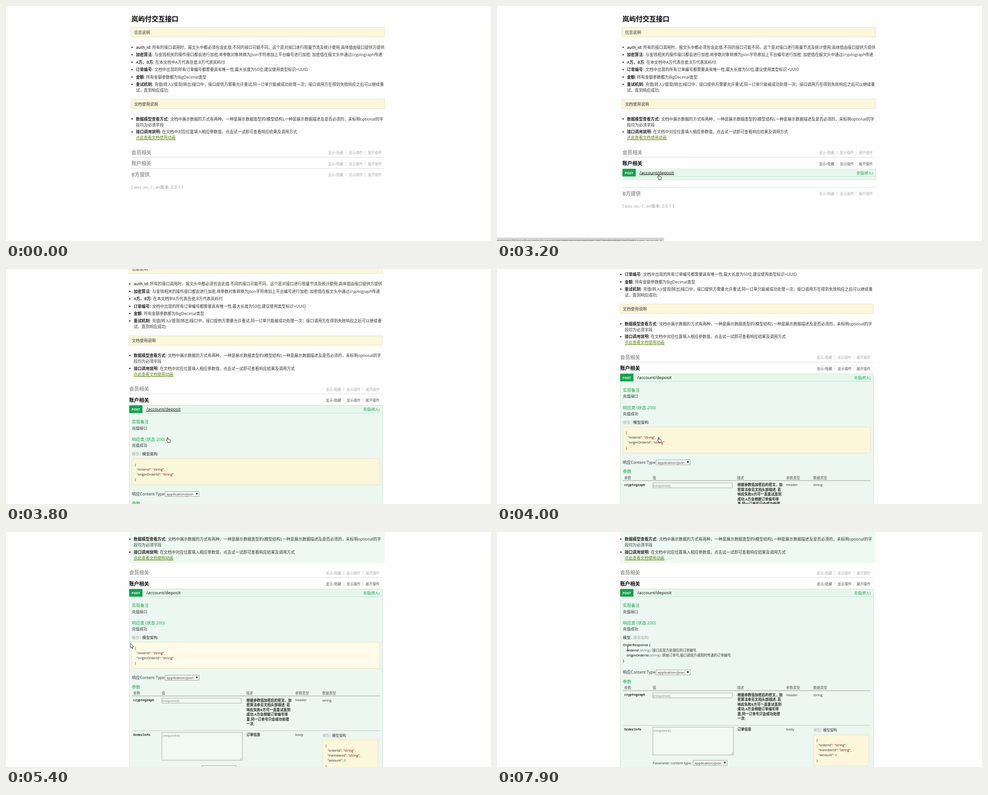
An HTML page that plays this animation: 1075 px wide and 521 px high, repeating every 8 s.

```html
<!DOCTYPE html>
<html lang="zh-CN">
<head>
<meta charset="utf-8">
<title>接口文档</title>
<style>
  html, body { margin: 0; width: 100%; height: 100%; overflow: hidden; background: #fefefe; }
  svg { display: block; }
  text { font-family: 'Open Sans', 'Noto Sans CJK SC', 'Noto Sans CJK', sans-serif; font-size: 8.8px; fill: #333; white-space: pre; }
  .b { font-weight: 600; fill: #222; }
  .h { font-size: 11px; font-weight: 700; fill: #999; }
  .o { font-size: 7.7px; fill: #aaa; }
  .on .h { fill: #000; }
  .on .o { fill: #555; }
  .g { font-size: 9.3px; fill: #10a54a; }
  .s { font-size: 7.7px; }
  .d { font-size: 7.7px; font-weight: 600; fill: #222; }
  .m { font: 700 7px 'Noto Sans Mono', 'DejaVu Sans Mono', monospace; fill: #222; }
  .ph { font-size: 7.8px; font-weight: 700; fill: #aaa; }
  .c { font-size: 7.4px; fill: #222; }
  .r { fill: #800000; }
  .n { fill: #2a8a3c; }
  .md { font-size: 7.5px; }
  .u { text-decoration: underline; }
  .note { fill: #fcf6db; stroke: #ebe3c2; }
  .field { fill: #f0f9f4; stroke: #aaa; }
</style>
</head>
<body>
<svg id="stage" xmlns="http://www.w3.org/2000/svg" width="1075" height="521" viewBox="0 0 1075 521"></svg>
<script>
const txt = (x, y, s, cls = '', extra = '') => `<text x="${x}" y="${y}" class="${cls}" ${extra}>${s}</text>`;
const box = (x, y, w, h, attrs) => `<rect x="${x}" y="${y}" width="${w}" height="${h}" ${attrs}/>`;
const rule = (x, y, w, color) => `<path d="M${x} ${y}h${w}" stroke="${color}"/>`;
const bar = (x, y, h = 9) => `<path d="M${x} ${y}v${h}" stroke="#ddd"/>`;
const dot = y => `<circle cx="279.5" cy="${y}" r="1.5" fill="#222"/>`;
const item = (y, label, x, s) => dot(y) + txt(288, y + 3.3, label, 'b') + txt(x, y + 3.3, s);
const note = (y, s) => box(277.5, y, 561.5, 21, 'class="note"') + txt(284, y + 14, s);
const section = (y, name, id = '') =>
  `<g id="${id}">` + txt(278, y + 4, name, 'h') +
  txt(714, y + 3.8, '显示/隐藏', 'o') + bar(753.5, y - 4) + txt(760, y + 3.8, '显示操作', 'o') +
  bar(796, y - 4) + txt(802, y + 3.8, '展开操作', 'o') + '</g>';
const select = (x, y) => box(x, y, 75.5, 11, 'fill="#f7fcf9" stroke="#999"') +
  txt(x + 3.5, y + 8.6, 'application/json', '', 'style="font-size:8px"') +
  `<path d="M${x + 68} ${y + 3.2}h5l-2.5 4.4z" fill="#222"/>`;
const pair = (x, y, key, val, end = ',') =>
  txt(x, y, `"${key}": ` + (val === 0 ? '<tspan class="n">0</tspan>' : `<tspan class="r">"${val}"</tspan>`) + end, 'c');
const prop = (y, name, desc) => txt(287, y,
  `<tspan class="b">${name}</tspan> <tspan fill="#888">(<tspan fill="#5555aa">string</tspan>)</tspan>: ${desc}`, 'md');

const intro =
  txt(278, 33.5, '岚屿付交互接口', '', 'style="font-size:14.9px;font-weight:700;fill:#000"') +
  note(47.5, '信息说明') +
  item(91.5, 'auth_id:', 324, '所有的接口调用时，报文头中都必须包含此值.不同的接口可能不同，这个是对接口进行限量节流及统计使用;具体值由接口提供方提供') +
  item(108, '加密算法:', 329, '与金钱相关的操作接口都会进行加密,将参数对象转换为json字符串加上平台编号进行加密; 加密值在报文头中通过cryptograph传递') +
  item(124.5, 'A方、B方:', 331, '在本文档中A方代表岳瓷,B方代表岚屿付') +
  item(141, '订单编号:', 329, '文档中出现的所有订单编号都需要具有唯一性;最大长度为50位,建议使用类型标识+UUID') +
  item(157.3, '金额:', 310.5, '所有金额参数都为BigDecimal类型') +
  item(173.5, '重试机制:', 329, '充值(转入)/提现(转出)接口中，接口提供方需要允许重试,同一订单只能被成功处理一次；接口调用方在得到失败响应之后可以继续重') +
  txt(288, 189.8, '试，直到响应成功;') +
  note(206.5, '文档使用说明') +
  item(250.3, '数据模型查看方式:', 364, '文档中展示数据的方式有两种，一种是展示数据类型的(模型结构),一种是展示数据描述及是否必须的，未标明optional的字') +
  txt(288, 266.6, '段均为必须字段') +
  item(279, '接口调用说明:', 346, '在文档中对应位置填入相应参数值，点击试一试即可查看响应结果及调用方式') +
  txt(288, 295.3, '点此查看文档使用动画', 'u', 'style="fill:#547f00"') +
  section(324.5, '会员相关') + rule(278, 335.5, 561, '#ddd') +
  section(349, '账户相关', 'account');

const footer = rule(278, 360.5, 561, '#ddd') + section(373.5, 'B方提供') +
  txt(278, 404.8, '[ <tspan font-variant="small-caps">base url</tspan>: / , <tspan font-variant="small-caps">api</tspan>版本: 0.0.1 ]', '', 'style="font-size:9.4px;fill:#999"');

const descLines = ['根据参数值加密后的密文，加', '密算法参见文档头部描述; 若', '响应失败B方可一直重试直到',
  '成功,A方会根据订单编号排', '重,同一订单号只会成功处理', '一次;'];

const params =
  txt(279, 326, '响应Content Type') + select(352.5, 317.5) +
  txt(279, 346.5, '参数', 'g') +
  [[282, '参数'], [345, '值'], [532, '描述'], [641, '参数类型'], [701, '数据类型']]
    .map(([x, s]) => txt(x, 360, s, 's', 'style="fill:#555"')).join('') +
  rule(279, 363.5, 549, '#999') +
  txt(282, 375, 'cryptograph', 'm') +
  box(345.5, 368.5, 176, 11, 'class="field"') + txt(346, 377.3, '(required)', 'ph') +
  descLines.map((s, i) => txt(533, 375.5 + i * 10.5, s, 'd')).join('') +
  txt(641, 375.3, 'header', 's') + txt(701, 375.8, 'string', 's') +
  rule(279, 440.5, 549, '#c4c8c6') +
  txt(282, 451.5, 'OrderInfo', 'm') +
  box(345.5, 444.5, 178.5, 61.5, 'class="field"') + txt(347, 454.3, '(required)', 'ph') +
  '<path d="M518.5 504.5l4-4M521 504.5l1.5-1.5" stroke="#888" stroke-width=".8"/>' +
  txt(533, 452.2, '订单信息', 'd') + txt(641, 452, 'body', 's') +
  txt(702, 454, '模型', 's', 'style="fill:#aaa"') + bar(719.5, 446.5) + txt(723, 454, '模型架构', 's') +
  box(701.5, 461.5, 123, 68.5, 'class="note"') +
  txt(708, 476, '{', 'c') + pair(712.5, 487, 'orderId', 'string') + pair(712.5, 498, 'memberId', 'string') +
  pair(712.5, 509, 'amount', 0, '') + txt(708, 520.5, '}', 'c') +
  txt(345, 526.4, 'Parameter content type:', 's') + select(434.5, 518);

const body =
  '<rect id="sheet" x="273.5" y="143.5" width="561" rx="2" fill="#ebf7f0" stroke="#c3e8d1"/>' +
  '<g clip-path="url(#bodyClip)">' +
  txt(279, 166.4, '实现备注', 'g') + txt(279, 179.5, '充值接口', '', 'style="font-size:8.5px"') +
  txt(279, 205, '响应类 (状态 200)', 'g') + txt(279, 218.2, '充值成功', '', 'style="font-size:8.5px"') +
  txt(279, 237.3, '模型', '', 'id="tabA" style="font-size:8.5px"') + bar(298.5, 229.5) +
  txt(302, 237.3, '模型架构', '', 'id="tabB" style="font-size:8.5px"') +
  '<g id="schema">' + box(279, 244.5, 549, 58, 'class="note" id="code"') +
  txt(285.5, 259.5, '{', 'c r') + pair(290, 270.5, 'orderId', 'string') +
  pair(290, 281.7, 'originOrderId', 'string', '') + txt(285.5, 293, '}', 'c r') + '</g>' +
  '<g id="model">' + txt(279, 253, 'OrderResponse {', 'md b') +
  prop(264.5, 'orderId', '接口实现方处理后的订单编号,') +
  prop(275.7, 'originOrderId', '原始订单号,接口调用方调用时传递的订单编号') + txt(279, 287.5, '}', 'md b') + '</g>' +
  `<g id="params">${params}</g></g>`;

const row = box(273.5, 126.5, 561, 17, 'fill="#e7f6ec" stroke="#c3e8d1"') +
  box(273, 126.3, 29.5, 17, 'rx="1.5" fill="#10a54a"') +
  txt(287.7, 138.2, 'POST', '', 'text-anchor="middle" style="font-size:7.4px;font-weight:700;fill:#fff"') +
  txt(311, 138, '/account/deposit', '', 'id="path" style="font-size:9.65px;fill:#000"') +
  txt(828, 138, '充值(转入)', '', 'text-anchor="end" style="font-size:7.9px;fill:#10a54a"');

const pointers =
  '<path id="arrow" d="M-3 -6v10.2l2.4-2.2 1.7 3.8 1.6-.7-1.7-3.7h3.3z" fill="#fff" stroke="#111" stroke-width=".8"/>' +
  '<path id="hand" d="M-2.6 -5.2q.9-1.2 1.8 0v4l1.5-.3 1.6.5 1.3.5q.8.3.8 1.4l-.7 3.1v1.8h-5v-1.6l-3-4q.1-1.3 1.7-.3z" fill="#fff" stroke="#111" stroke-width=".9"/>' +
  '<path id="beam" d="M-2 -5h1.4l.6.6.6-.6h1.4M0 -4.4v8.8M-2 5h1.4l.6-.6.6.6h1.4" fill="none" stroke="#222" stroke-width=".9"/>';

const stage = document.getElementById('stage');
stage.innerHTML =
  `<defs><clipPath id="openClip">${box(270, 126, 570, 0, 'id="openRect"')}</clipPath>` +
  `<clipPath id="bodyClip">${box(270, 143, 570, 0, 'id="bodyRect"')}</clipPath></defs>` +
  box(273, 0, 566, 69, 'id="tint" fill="#eef9f2"') +
  `<g id="page">${intro}<g id="below">${footer}</g>` +
  `<g transform="translate(5 234.5)" clip-path="url(#openClip)">${body}${row}</g></g>` +
  '<g id="status">' + box(-3, 513.5, 373.5, 12, 'rx="2" fill="#d6d6d6"') +
  txt(-1, 522.7, '', '', 'id="url" style="font-size:7.4px;fill:#666"') + '</g>' +
  `<g id="cursor">${pointers}</g>`;

const $ = id => document.getElementById(id);
const show = (id, on) => $(id).style.display = on ? '' : 'none';
const underline = (id, on) => $(id).style.textDecoration = on ? 'underline' : 'none';

// Key tables: [time, value...], linear in between.
const openKeys = [[2000, 0], [2400, 35], [3100, 35], [3200, 42], [3300, 150], [3600, 640]];
const scrollKeys = [[3700, 0], [3800, 58.5], [4300, 234.5]];
const statusKeys = [[1300, 0], [1800, .55], [1900, 1], [3200, 1], [3600, 0], [5700, 0], [5900, 1], [7300, 1], [7900, 0]];
const moveKeys = [[400, 1061, 33], [500, 783, 167], [600, 520, 265], [700, 430, 325], [800, 367, 359],
  [900, 327, 359], [1000, 304, 355], [1200, 300, 355], [2500, 300, 355], [2900, 360, 379], [4200, 360, 379],
  [4300, 363, 371], [4600, 363, 371], [4700, 340, 355], [5000, 228, 320], [5300, 270, 268], [5500, 288, 238],
  [7200, 288, 238], [7600, 290, 258]];
const pointerKeys = [[400, 'arrow'], [1300, 'hand'], [2600, 'arrow'], [2800, 'hand'], [4300, 'beam'],
  [4800, 'arrow'], [5600, 'hand'], [6500, 'arrow'], [7500, 'beam']];

function at(keys, t) {
  const i = keys.findIndex(k => k[0] > t);
  if (i < 0) return keys[keys.length - 1].slice(1);
  if (!i) return keys[0].slice(1);
  const a = keys[i - 1], b = keys[i], p = (t - a[0]) / (b[0] - a[0]);
  return a.slice(1).map((v, j) => v + (b[j + 1] - v) * p);
}

const host = 'evstation:7070/ui/?url=lanyufu.yaml#';
const tag = '账户相关';
const heading = $('account').firstChild;

function draw(t) {
  const [open] = at(openKeys, t), [scroll] = at(scrollKeys, t), [x, y] = at(moveKeys, t);
  const inner = Math.max(0, open - 35), model = t >= 6700;

  $('page').setAttribute('transform', `translate(${t < 3300 ? 0 : -5} ${-scroll})`);
  $('below').setAttribute('transform', `translate(0 ${open})`);
  $('openRect').setAttribute('height', open);
  $('bodyRect').setAttribute('height', inner);
  $('sheet').setAttribute('height', inner);
  show('sheet', inner > 0);
  show('tint', t >= 4300);

  $('account').setAttribute('class', t >= 800 ? 'on' : '');
  heading.style.textDecoration = t >= 1000 && t < 2600 ? 'underline' : 'none';
  underline('path', t >= 2800 && t < 3900);

  const overTab = t >= 5600 && !model;
  $('tabA').style.fill = overTab || model ? '#222' : '#aaa';
  $('tabB').style.fill = model ? '#aaa' : '#222';
  underline('tabA', overTab);
  show('schema', !model);
  show('model', model);
  $('code').style.fill = t >= 5300 && t < 5500 ? '#fffbe6' : '';
  $('params').setAttribute('transform', `translate(0 ${model ? -11.7 : 0})`);

  $('status').setAttribute('opacity', at(statusKeys, t)[0]);
  $('url').textContent = host + (t < 2800 ? '!/' + tag : t < 5000 ? '!/' + encodeURIComponent(tag) + '/post_account_d...' : '');

  const kind = pointerKeys.reduce((k, [from, name]) => t >= from ? name : k, '');
  ['arrow', 'hand', 'beam'].forEach(id => show(id, id === kind));
  $('cursor').setAttribute('transform', `translate(${x} ${y})`);
}

function tick() {
  draw(Math.floor(performance.now() % 8000 / 100) * 100);
  requestAnimationFrame(tick);
}
tick();
</script>
</body>
</html>
```
